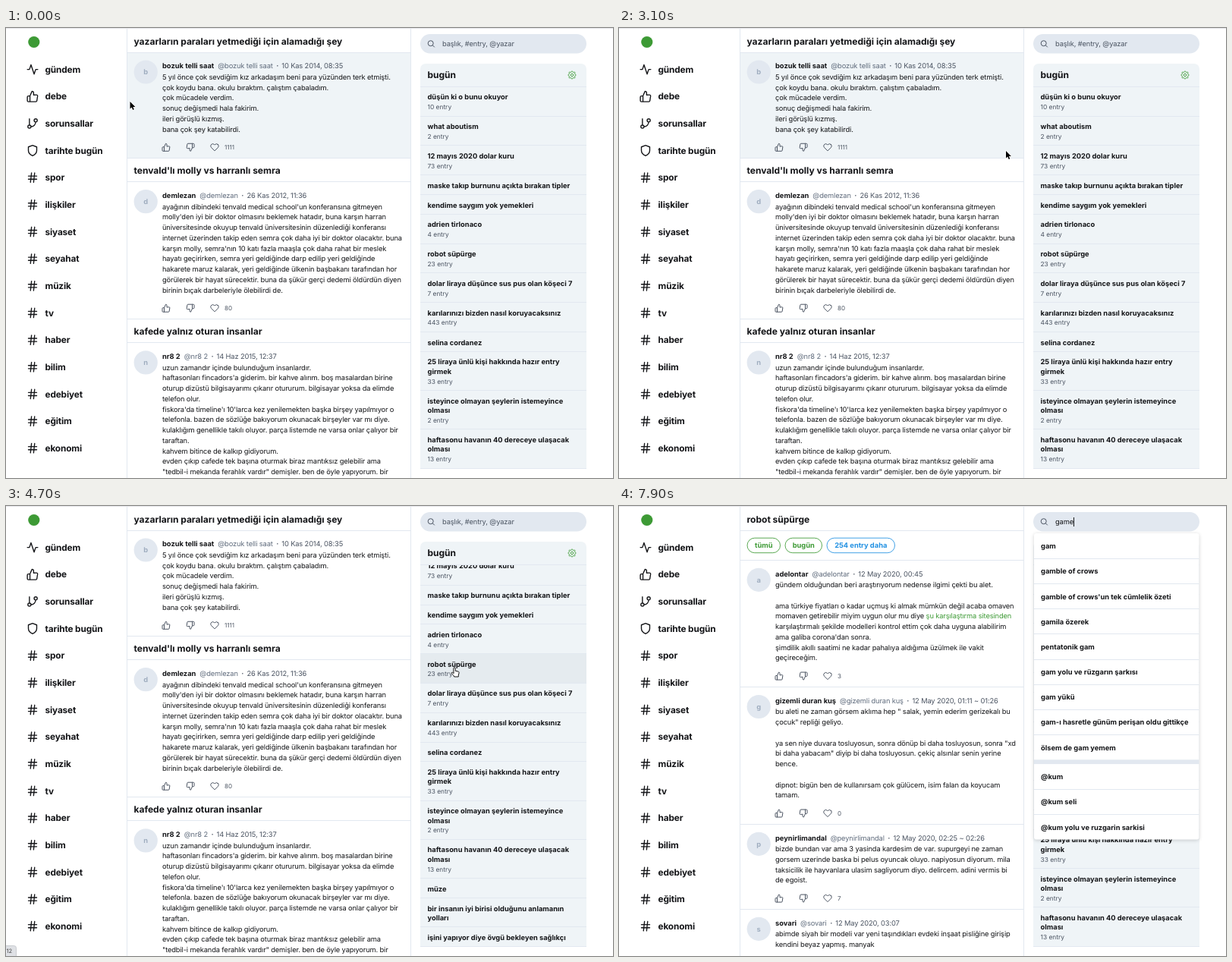
Animation of 800 by 593 pixels, one loop 8 s. Source, as an HTML page with a canvas:

```html
<!DOCTYPE html>
<html lang="tr">
<head>
<meta charset="utf-8">
<title>bugün</title>
<style>
html, body { margin: 0; width: 100%; height: 100%; overflow: hidden; background: #fff; }
canvas { display: block; width: 800px; height: 593px; }
</style>
</head>
<body>
<canvas id="stage"></canvas>
<script>
const W = 800, H = 593, LOOP = 8000, STEP = 100;
const canvas = document.getElementById('stage');
const ctx = canvas.getContext('2d');
const dpr = window.devicePixelRatio || 1;
canvas.width = W * dpr;
canvas.height = H * dpr;
ctx.textRendering = 'geometricPrecision';

const INK = '#141518', SLATE = '#4a5361', MUTED = '#5f6b7c', LINE = '#e2e8f0';
const PALE = '#eff4f7', HOVER = '#e5ebef', GREEN = '#3d9a35', BLUE = '#2090e2';

// weight, size, letter spacing
const FONT = {
  body: [400, 9.3, -0.13],
  bold: [700, 9.3, 0.01],
  title: [700, 12, 0],
  nav: [700, 11.8, -0.13],
  small: [400, 8.4, 0],
  count: [400, 8, 0],
  tip: [400, 7.5, 0]
};

const ICON = {
  pulse: 'M22 12h-4l-3 9L9 3l-3 9H2',
  up: 'M14 9V5a3 3 0 0 0-3-3l-4 9v11h11.28a2 2 0 0 0 2-1.7l1.38-9a2 2 0 0 0-2-2.3zM7 22H4a2 2 0 0 1-2-2v-7a2 2 0 0 1 2-2h3',
  down: 'M10 15v4a3 3 0 0 0 3 3l4-9V2H5.72a2 2 0 0 0-2 1.7l-1.38 9a2 2 0 0 0 2 2.3zm7-13h2.67A2.31 2.31 0 0 1 22 4v7a2.31 2.31 0 0 1-2.33 2H17',
  branch: 'M6 3v12M18 9a9 9 0 0 1-9 9M15 6a3 3 0 1 0 6 0a3 3 0 1 0-6 0M3 18a3 3 0 1 0 6 0a3 3 0 1 0-6 0',
  shield: 'M12 22s8-4 8-10V5l-8-3-8 3v7c0 6 8 10 8 10z',
  hash: 'M4 9h16M4 15h16M10 3L8 21M16 3l-2 18',
  heart: 'M20.84 4.61a5.5 5.5 0 0 0-7.78 0L12 5.67l-1.06-1.06a5.5 5.5 0 0 0-7.78 7.78l1.06 1.06L12 21.23l7.78-7.78 1.06-1.06a5.5 5.5 0 0 0 0-7.78z'
};
for (const k in ICON) ICON[k] = new Path2D(ICON[k]);
const ARROW = new Path2D('M0 0V9.6L2.2 7.6L3.7 11L5.3 10.3L3.8 7H6.9Z');
const HAND = new Path2D('M-1.2 1a1.2 1.2 0 0 1 2.4 0v3.2l4 1c.8.2 1 .8.9 1.6l-.8 3.4v1.8h-5.6c-.5-1.6-2.4-3-3.4-4.6-.5-.9.6-1.6 1.3-1l1.2 1z');
const BEAM = new Path2D('M-2 0Q0 0 0 1.5Q0 0 2 0M0 1.5V9M-2 10.5Q0 10.5 0 9Q0 10.5 2 10.5M-1.2 6.5H1.2');

const NAV = ['gündem', 'debe', 'sorunsallar', 'tarihte bugün', 'spor', 'ilişkiler', 'siyaset',
  'seyahat', 'müzik', 'tv', 'haber', 'bilim', 'edebiyet', 'eğitim', 'ekonomi'];
const NAV_ICONS = ['pulse', 'up', 'branch', 'shield'];

// title, entry count
const TOPICS = [
  ['düşün ki o bunu okuyor', 10],
  ['what aboutism', 2],
  ['12 mayıs 2020 dolar kuru', 73],
  ['maske takıp burnunu açıkta bırakan tipler'],
  ['kendime saygım yok yemekleri'],
  ['adrien tirlonaco', 4],
  ['robot süpürge', 23],
  ['dolar liraya düşünce sus pus olan köşeci 7', 7],
  ['karılarınızı bizden nasıl koruyacaksınız', 443],
  ['selina cordanez'],
  ['25 liraya ünlü kişi hakkında hazır entry\ngirmek', 33],
  ['isteyince olmayan şeylerin istemeyince\nolması', 2],
  ['haftasonu havanın 40 dereceye ulaşacak\nolması', 13],
  ['müze'],
  ['bir insanın iyi birisi olduğunu anlamanın\nyolları'],
  ['işini yapıyor diye övgü bekleyen sağlıkçı']
];

const HITS = ['gam', 'gamble of crows', "gamble of crows'un tek cümlelik özeti", 'gamila özerek',
  'pentatonik gam', 'gam yolu ve rüzgarın şarkısı', 'gam yükü',
  'gam-ı hasretle günüm perişan oldu gittikçe', 'ölsem de gam yemem'];
const USERS = ['@kum', '@kum seli', '@kum yolu ve ruzgarin sarkisi'];

const FEED = [
  { title: 'yazarların paraları yetmediği için alamadığı şey', y: 50, name: 'bozuk telli saat', date: '10 Kas 2014, 08:35', likes: 1111,
    text: `5 yıl önce çok sevdiğim kız arkadaşım beni para yüzünden terk etmişti.
çok koydu bana. okulu bıraktım. çalıştım çabaladım.
çok mücadele verdim.
sonuç değişmedi hala fakirim.
ileri görüşlü kızmış.
bana çok şey katabilirdi.` },
  { title: "tenvald'lı molly vs harranlı semra", y: 220.7, name: 'demlezan', date: '26 Kas 2012, 11:36', likes: 80,
    text: `ayağının dibindeki tenvald medical school'un konferansına gitmeyen
molly'den iyi bir doktor olmasını beklemek hatadır, buna karşın harran
üniversitesinde okuyup tenvald üniversitesinin düzenlediği konferansı
internet üzerinden takip eden semra çok daha iyi bir doktor olacaktır. buna
karşın molly, semra'nın 10 katı fazla maaşla çok daha rahat bir meslek
hayatı geçirirken, semra yeri geldiğinde darp edilip yeri geldiğinde
hakarete maruz kalarak, yeri geldiğinde ülkenin başbakanı tarafından hor
görülerek bir hayat sürecektir. buna da şükür gerçi dedemi öldürdün diyen
birinin bıçak darbeleriyle ölebilirdi de.` },
  { title: 'kafede yalnız oturan insanlar', y: 432.9, name: 'nr8 2', date: '14 Haz 2015, 12:37', likes: 0,
    text: `uzun zamandır içinde bulunduğum insanlardır.
haftasonları fincadors'a giderim. bir kahve alırım. boş masalardan birine
oturup dizüstü bilgisayarımı çıkarır otururum. bilgisayar yoksa da elimde
telefon olur.
fiskora'da timeline'ı 10'larca kez yenilemekten başka birşey yapılmıyor o
telefonla. bazen de sözlüğe bakıyorum okunacak birşeyler var mı diye.
kulaklığım genellikle takılı oluyor. parça listemde ne varsa onlar çalıyor bir
taraftan.
kahvem bitince de kalkıp gidiyorum.
evden çıkıp cafede tek başına oturmak biraz mantıksız gelebilir ama
"tedbil-i mekanda ferahlık vardır" demişler. ben de öyle yapıyorum. bir` }
];

// a bar marks the start of a link
const THREAD = [
  { y: 89.3, name: 'adelontar', date: '12 May 2020, 00:45', likes: 3,
    text: `gündem olduğundan beri araştırıyorum nedense ilgimi çekti bu alet.

ama türkiye fiyatları o kadar uçmuş ki almak mümkün değil acaba omaven
momaven getirebilir miyim uygun olur mu diye |şu karşılaştırma sitesinden
karşılaştırmalı şekilde modelleri kontrol ettim çok daha uyguna alabilirim
ama galiba corona'dan sonra.
şimdilik akıllı saatimi ne kadar pahalıya aldığıma üzülmek ile vakit
geçireceğim.` },
  { y: 256.5, name: 'gizemli duran kuş', date: '12 May 2020, 01:11 ~ 01:26', likes: 0,
    text: `bu aleti ne zaman görsem aklıma hep " salak, yemin ederim gerizekalı bu
çocuk" repliği geliyo.

ya sen niye duvara tosluyosun, sonra dönüp bi daha tosluyosun, sonra "xd
bi daha yabacam" diyip bi daha tosluyosun. çekiç alsınlar senin yerine
bence.

dipnot: bigün ben de kullanırsam çok gülücem, isim falan da koyucam
tamam.` },
  { y: 437.3, name: 'peynirlimandal', date: '12 May 2020, 02:25 ~ 02:26', likes: 7,
    text: `bizde bundan var ama 3 yasinda kardesim de var. supurgeyi ne zaman
gorsem uzerinde baska bi pelus oyuncak oluyo. napiyosun diyorum. mila
taksicilik ile hayvanlara ulasim sagliyorum diyo. delircem. adini vermis bi
de egoist.` },
  { y: 549.3, name: 'sovari', date: '12 May 2020, 03:07', likes: 0,
    text: `abimde siyah bir modeli var yeni taşındıkları evdeki inşaat pisliğine girişip
kendini beyaz yapmış. manyak` }
];

// time, x, y of the pointer tip
const PATH = [[100, 163.5, 97], [900, 38, 21], [1000, 39, 20.5], [1700, 39, 20.5], [2300, 400, 130],
  [2500, 400, 130], [3100, 510, 162], [3300, 572, 200], [3600, 586.5, 226], [4200, 586.5, 226],
  [4500, 591, 213], [5200, 591, 213], [6000, 592.5, 20]];

const clamp = v => Math.max(0, Math.min(1, v));
const ease = v => v * v * (3 - 2 * v);
const ramp = (t, a, b) => ease(clamp((t - a) / (b - a)));

function pointerAt(t) {
  let [, x, y] = PATH[0];
  for (let i = 1; i < PATH.length; i++) {
    const [t0] = PATH[i - 1], [t1, x1, y1] = PATH[i];
    const k = ramp(t, t0, t1);
    x += (x1 - x) * k;
    y += (y1 - y) * k;
  }
  return { x, y };
}

// Draws text centred vertically on y and returns its width.
function text(s, x, y, style, color = INK, align = 'left') {
  const [weight, size, gap] = FONT[style];
  ctx.font = `${weight} ${size}px Inter, "Noto Sans", sans-serif`;
  ctx.letterSpacing = gap + 'px';
  ctx.textAlign = align;
  ctx.fillStyle = color;
  ctx.fillText(s, x, y + size * 0.36);
  return ctx.measureText(s).width;
}

function rect(x, y, w, h, color) {
  ctx.fillStyle = color;
  ctx.fillRect(x, y, w, h);
}

function round(x, y, w, h, r, fill, stroke) {
  ctx.beginPath();
  ctx.roundRect(x, y, w, h, r);
  if (fill) { ctx.fillStyle = fill; ctx.fill(); }
  if (stroke) { ctx.strokeStyle = stroke; ctx.lineWidth = 0.85; ctx.stroke(); }
}

function disc(x, y, r, color) {
  ctx.beginPath();
  ctx.arc(x, y, r, 0, Math.PI * 2);
  ctx.fillStyle = color;
  ctx.fill();
}

function icon(name, x, y, scale, color) {
  ctx.save();
  ctx.translate(x, y);
  ctx.scale(scale, scale);
  ctx.translate(-12, -12);
  ctx.lineWidth = 2;
  ctx.lineCap = ctx.lineJoin = 'round';
  ctx.strokeStyle = color;
  ctx.stroke(ICON[name]);
  ctx.restore();
}

function gear(x, y) {
  ctx.beginPath();
  for (let i = 0; i <= 64; i++) {
    const a = i * Math.PI / 32, r = 4.5 + 0.8 * Math.cos(8 * a);
    ctx.lineTo(x + r * Math.cos(a), y + r * Math.sin(a));
  }
  ctx.moveTo(x + 1.7, y);
  ctx.arc(x, y, 1.7, 0, Math.PI * 2);
  ctx.strokeStyle = GREEN;
  ctx.lineWidth = 0.9;
  ctx.stroke();
}

function drawNav(t) {
  if (t >= 900 && t < 1800) disc(37, 18.5, 15, '#e4f1e4');
  disc(36.8, 18.5, 7.6, GREEN);
  NAV.forEach((label, i) => {
    const y = 54.6 + i * 35.65;
    icon(NAV_ICONS[i] || 'hash', 35, y, 0.6875, INK);
    text(label, 51.5, y, 'nav');
  });
}

function drawEntry(e, mouse) {
  const lines = e.text.split('\n');
  const foot = e.y + 38.5 + (lines.length - 1) * 13.75;
  const top = e.y - 18, end = foot + 14.5;
  if (mouse && mouse.x > 160 && mouse.x < 533 && mouse.y > top && mouse.y < end)
    rect(160, top, 373, end - top, PALE);
  disc(184.2, e.y + 8, 15.6, LINE);
  text(e.name[0], 184.2, e.y + 8, 'bold', '#a0aec0', 'center');
  let x = 206 + text(e.name, 206, e.y, 'bold') + 5;
  x += text('@' + e.name, x, e.y, 'body', MUTED) + 4.5;
  x += text('·', x, e.y, 'bold', SLATE) + 4;
  text(e.date, x, e.y, 'body', SLATE);
  lines.forEach((line, i) => {
    const y = e.y + 14.5 + i * 13.75, [plain, link] = line.split('|');
    const w = text(plain, 206, y, 'body');
    if (link) text(link, 206 + w, y, 'body', GREEN);
  });
  icon('up', 211, foot, 0.5, SLATE);
  icon('down', 243, foot, 0.5, SLATE);
  icon('heart', 275, foot, 0.5, SLATE);
  text(String(e.likes), 288, foot, 'count', SLATE);
  rect(160, Math.round(end) - 1, 373, 1, LINE);
}

function pill(label, x, w, color) {
  round(x, 42.2, w, 19.5, 9.75, '#fff', color);
  text(label, x + w / 2, 52, 'bold', color, 'center');
}

function drawFeed(mouse) {
  for (const e of FEED) {
    drawEntry(e, mouse);
    text(e.title, 168.5, e.y - 32.8, 'title');
    rect(160, Math.round(e.y - 18.5), 373, 1, LINE);
  }
}

function drawThread() {
  text('robot süpürge', 168.5, 17.2, 'title');
  rect(160, 32, 373, 1, LINE);
  pill('tümü', 169, 43.5, GREEN);
  pill('bugün', 219, 48.5, GREEN);
  pill('254 entry daha', 274, 89.5, BLUE);
  rect(160, 71, 373, 1, LINE);
  THREAD.forEach(e => drawEntry(e));
}

function drawTopics(t, mouse) {
  const scroll = t < 4900 ? 89.5 * ramp(t, 3300, 3800) : 0;
  const live = t < 4900 || t > 5200;
  round(546, 47, 219, 534, [7, 7, 0, 0], PALE);
  text('bugün', 555.5, 62, 'title');
  gear(746, 62);
  rect(546, 77, 219, 1, LINE);

  ctx.save();
  ctx.beginPath();
  ctx.rect(546, 78, 219, 503);
  ctx.clip();
  let y = 77.8 - scroll;
  for (const [title, count] of TOPICS) {
    const lines = title.split('\n');
    const h = 25.8 + (count ? 13 : 0) + (lines.length - 1) * 12.5;
    const over = mouse.x > 546 && mouse.y > Math.max(y, 78) && mouse.y < y + h;
    if (live && over) rect(546, y, 219, h, HOVER);
    lines.forEach((s, i) => text(s, 555.5, y + 13.2 + i * 12.5, 'bold'));
    if (count) text(count + ' entry', 555.5, y + h - 12.6, 'small', SLATE);
    y += h;
    rect(546, Math.round(y) - 1, 219, 1, LINE);
  }
  ctx.restore();

  if (t >= 3400 && t < 4300) {
    ctx.globalAlpha = 1 - ramp(t, 4000, 4300);
    round(759, 78 + scroll * 0.55, 5, 276, 2.5, '#7e8184');
    ctx.globalAlpha = 1;
  }
}

function drawSearch(t) {
  const typed = 'game'.slice(0, Math.max(0, Math.floor((t - 7500) / 100)));
  round(546, 8, 219, 25.5, 12.75, LINE);
  ctx.beginPath();
  ctx.arc(559.7, 20.2, 3.5, 0, Math.PI * 2);
  ctx.moveTo(562.3, 22.8);
  ctx.lineTo(564.8, 25.3);
  ctx.strokeStyle = SLATE;
  ctx.lineWidth = 1;
  ctx.stroke();
  const w = text(typed || 'başlık, #entry, @yazar', 575, 21, 'body', typed ? INK : SLATE);
  const lit = t >= 6500 && (t < 7000 || t >= 7500);
  if (lit) rect(typed ? 575 + w : 574.8, 15, 1, 12, INK);
}

function drawHits() {
  ctx.save();
  ctx.shadowColor = 'rgba(0,0,0,.18)';
  ctx.shadowBlur = 5 * dpr;
  ctx.shadowOffsetY = dpr;
  round(547, 36, 217.5, 403.5, 3, '#fff');
  ctx.restore();
  const row = (s, y, last) => {
    text(s, 556, y, 'bold');
    if (!last) rect(547, Math.round(y + 16), 217.5, 1, LINE);
  };
  HITS.forEach((s, i) => row(s, 53 + i * 33.15, i === HITS.length - 1));
  rect(547, 334.3, 217.5, 5.8, LINE);
  USERS.forEach((s, i) => row(s, 357 + i * 33.15, i === USERS.length - 1));
}

function drawPointer(t, { x, y }) {
  if (t >= 7600) return;
  const right = x > 546 && x < 765;
  const onLogo = Math.hypot(x - 37, y - 18.5) < 15;
  ctx.save();
  ctx.translate(x, y);
  ctx.lineJoin = ctx.lineCap = 'round';
  if (right && y < 34) {
    ctx.strokeStyle = '#222';
    ctx.lineWidth = 1;
    ctx.stroke(BEAM);
  } else if (onLogo || (right && y > 78)) {
    ctx.fillStyle = '#fff';
    ctx.strokeStyle = '#111';
    ctx.lineWidth = 1;
    ctx.fill(HAND);
    ctx.stroke(HAND);
  } else {
    ctx.strokeStyle = '#fff';
    ctx.lineWidth = 1.4;
    ctx.stroke(ARROW);
    ctx.fillStyle = '#000';
    ctx.fill(ARROW);
  }
  ctx.restore();
}

function drawStatus() {
  round(-4, 579.5, 17.5, 18, 3, '#dfe1e5', '#c3c6ca');
  text('12', 0.5, 586.5, 'tip', '#444');
}

function draw(t) {
  const mouse = pointerAt(t);
  ctx.setTransform(dpr, 0, 0, dpr, 0, 0);
  rect(0, 0, W, H, '#fff');
  drawNav(t);
  if (t < 4900) drawFeed(mouse);
  else drawThread();
  rect(159, 0, 1, H, LINE);
  rect(533, 0, 1, H, LINE);
  drawTopics(t, mouse);
  drawSearch(t);
  if (t >= 7900) drawHits();
  rect(0, 0, W, 1, '#e6e6ea');
  if (t >= 3500 && t < 5500) drawStatus();
  drawPointer(t, mouse);
}

const start = performance.now();
function tick() {
  const t = (performance.now() - start) % LOOP;
  draw(Math.floor(t / STEP) * STEP);
  requestAnimationFrame(tick);
}
tick();
</script>
</body>
</html>
```
